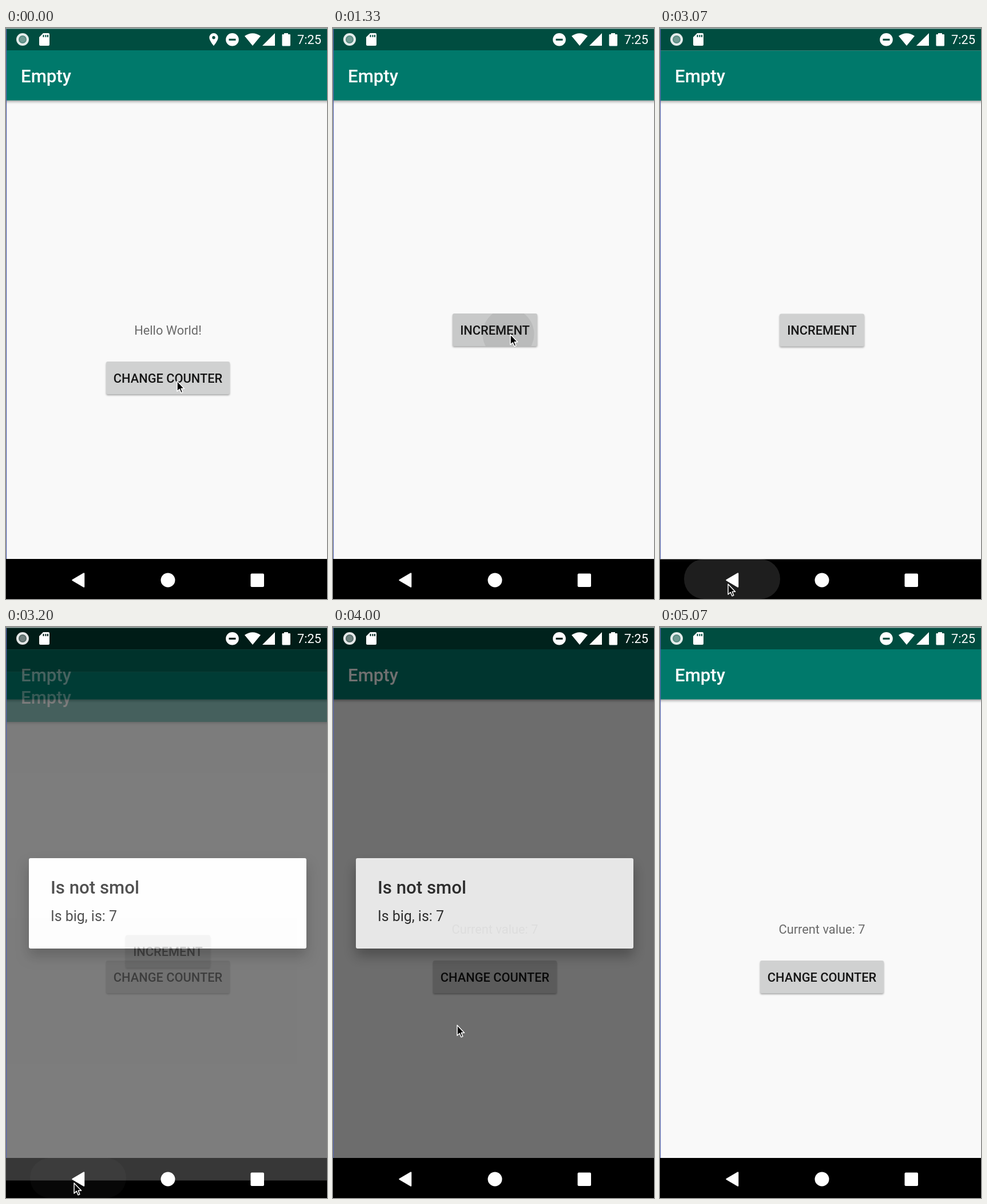
An HTML page for the animation above (5140 ms loop, 561 by 998 pixels).

```html
<!DOCTYPE html>
<html lang="en">
<head>
<meta charset="utf-8">
<title>Counter app</title>
<style>
  html, body { margin: 0; width: 100%; height: 100%; overflow: hidden; background: #000; }
  svg { display: block; }
  text { font: 400 21.8px Roboto, sans-serif; }
  .title { font-size: 31.2px; font-weight: 500; }
  .label { font-weight: 500; fill: #151515; text-anchor: middle; }
  .value { fill: #6a6a6a; text-anchor: middle; }
  .message { font-size: 24.9px; }
  .bar { filter: drop-shadow(0 2px 2.5px rgba(0,0,0,.38)); }
  .button { fill: #d0d1d1; filter: drop-shadow(0 2px 1.5px rgba(0,0,0,.32)); }
  .card { fill: #fff; filter: drop-shadow(0 13px 11px rgba(0,0,0,.34)); }
</style>
</head>
<body>
<svg width="561" height="998" viewBox="0 0 561 998">
  <defs>
    <g id="chrome">
      <rect width="561" height="928" fill="#f9f9f9"/>
      <rect class="bar" x="-10" y="39" width="581" height="87.500" fill="#00796b"/>
      <rect width="561" height="39" fill="#004d40"/>
      <text class="title" x="26" y="95" fill="#fff">Empty</text>
    </g>
  </defs>

  <rect width="561" height="998"/>

  <g id="main">
    <use href="#chrome"/>
    <text class="value" id="value" x="283" y="536"></text>
    <rect class="button" x="175" y="583" width="216" height="57" rx="3"/>
    <svg x="175" y="583" width="216" height="57">
      <g id="changeRipple">
        <rect width="216" height="57" rx="3" opacity=".05"/>
        <circle cx="125" cy="34" opacity=".07"/>
      </g>
    </svg>
    <text class="label" x="283" y="619.500">CHANGE COUNTER</text>
  </g>

  <rect id="dim" width="561" height="998"/>

  <g id="dialog" fill="#212121">
    <rect class="card" x="40" y="404" width="485" height="158" rx="3"/>
    <text class="title" x="78" y="466">Is not smol</text>
    <text class="message" x="78" y="514">Is big, is: 7</text>
  </g>

  <g id="counter">
    <use href="#chrome"/>
    <rect class="button" x="209" y="499" width="148" height="57" rx="3"/>
    <svg x="209" y="499" width="148" height="57">
      <g id="incrementRipple">
        <rect width="148" height="57" rx="3" opacity=".04"/>
        <circle cx="97.500" cy="36" opacity=".07"/>
      </g>
    </svg>
    <text class="label" x="283" y="535.500">INCREMENT</text>
  </g>

  <!-- Status bar -->
  <g fill="#fff" fill-rule="evenodd">
    <circle cx="29" cy="20" r="9" fill="#fff" fill-opacity=".35" stroke="#fff" stroke-opacity=".88" stroke-width="4"/>
    <circle cx="29" cy="20" r="5" opacity=".14"/>
    <path d="M65 9H74Q76 9 76 11V29Q76 31 74 31H60Q58 31 58 29V16ZM64.500 12V16H66.500V12ZM68.500 12V16H70.500V12ZM72 12V16H74V12Z"/>
    <path id="pin" d="M363 9A7.700 7.700 0 0 1 370.700 16.700C370.700 22 363 31 363 31S355.300 22 355.300 16.700A7.700 7.700 0 0 1 363 9ZM363 14A2.700 2.700 0 0 0 363 19.400A2.700 2.700 0 0 0 363 14Z"/>
    <path d="M395.500 9A11.300 11.300 0 0 1 395.500 31.600A11.300 11.300 0 0 1 395.500 9ZM389.500 18.700V22H401.500V18.700Z"/>
    <path d="M417 14Q431 4.500 445 14L431 31ZM448 31L470 9V31Z"/>
    <path d="M486 9H493V11H496Q497 11 497 12V30Q497 31.500 495.500 31.500H484Q482.500 31.500 482.500 30V12Q482.500 11 483.500 11H486Z"/>
    <text x="509" y="28.300">7:25</text>
  </g>

  <!-- Navigation bar -->
  <g fill="#fff">
    <rect id="backRipple" x="42" y="928" width="168" height="70" rx="35"/>
    <path d="M116.500 965L136 953.500V976.500Z" stroke="#fff" stroke-width="2.500" stroke-linejoin="round"/>
    <circle cx="283" cy="965" r="12.500"/>
    <rect x="427.500" y="953.500" width="23.500" height="23.500" rx="2"/>
  </g>

  <path d="M0 .7H561" stroke="#a9b7b4" stroke-width="1.400"/>
  <path d="M.6 2V928" stroke="#5867b0" stroke-width="1.200"/>

  <path id="cursor" d="M0 0V18L4.200 14.200L7 20.800L9.800 19.600L7.200 13.200H12.600Z" stroke="#fff" stroke-width="1.500" stroke-linejoin="round"/>
</svg>

<script>
const LOOP = 5140;
const SLIDE = 80;
const DIM = 0.64;
const $ = id => document.getElementById(id);

// time, x, y of the pointer
const pointerPath = [
  [0, 299, 617], [600, 299, 617], [1130, 310, 535.5], [2180, 310, 535.5],
  [2460, 111.5, 969], [2530, 115, 975], [2670, 119, 972], [3200, 119, 972],
  [3270, 164, 813], [3400, 217, 677], [3730, 217, 677], [3800, 217, 696],
  [4300, 217, 696], [4660, 480, 250]
];

const seg = (t, from, to) => Math.min(1, Math.max(0, (t - from) / (to - from)));
const smooth = p => p * p * (3 - 2 * p);

function pointerAt(t) {
  const i = Math.max(1, pointerPath.findIndex(k => k[0] > t));
  const [t0, x0, y0] = pointerPath[i - 1];
  const [t1, x1, y1] = pointerPath[i];
  const p = smooth(seg(t, t0, t1));
  return [x0 + (x1 - x0) * p, y0 + (y1 - y0) * p];
}

function setRipple(id, radius, opacity) {
  $(id).setAttribute("opacity", opacity);
  $(id).querySelector("circle").setAttribute("r", radius);
}

function draw(t) {
  $("value").textContent = t < 2900 ? "Hello World!" : "Current value: 7";
  $("pin").style.display = t < 300 ? "" : "none";

  setRipple("changeRipple", 130 * seg(t, 60, 330), seg(t, 60, 130) * (1 - seg(t, 300, 520)));
  setRipple("incrementRipple", 45 * seg(t, 1210, 1330) + 65 * seg(t, 1660, 1900),
    seg(t, 1210, 1300) * (1 - seg(t, 1670, 2000)));
  $("backRipple").setAttribute("opacity", 0.2 * seg(t, 2780, 2900) * (1 - seg(t, 2950, 3240)));

  // The counter screen rises in, then sinks away.
  const rise = (1 - seg(t, 200, 530)) ** 5;
  const sink = seg(t, 2984, 3234) ** 5;
  $("counter").setAttribute("transform", `translate(0 ${SLIDE * (rise + sink)})`);
  $("counter").setAttribute("opacity", seg(t, 200, 400) * (1 - seg(t, 3084, 3234)));

  const shown = seg(t, 2990, 3170);
  const scale = 0.9 + 0.1 * shown;
  $("dim").setAttribute("opacity", DIM * shown * (1 - seg(t, 3980, 4150)));
  $("dialog").setAttribute("opacity", shown * (1 - seg(t, 3980, 4110)));
  $("dialog").setAttribute("transform",
    `translate(282.5 483) scale(${scale}) translate(-282.5 -483)`);

  const visible = t < 4640;
  $("cursor").style.display = visible ? "" : "none";
  if (visible) $("cursor").setAttribute("transform", `translate(${pointerAt(t)})`);
}

function tick() {
  draw(performance.now() % LOOP);
  requestAnimationFrame(tick);
}
tick();
</script>
</body>
</html>
```
